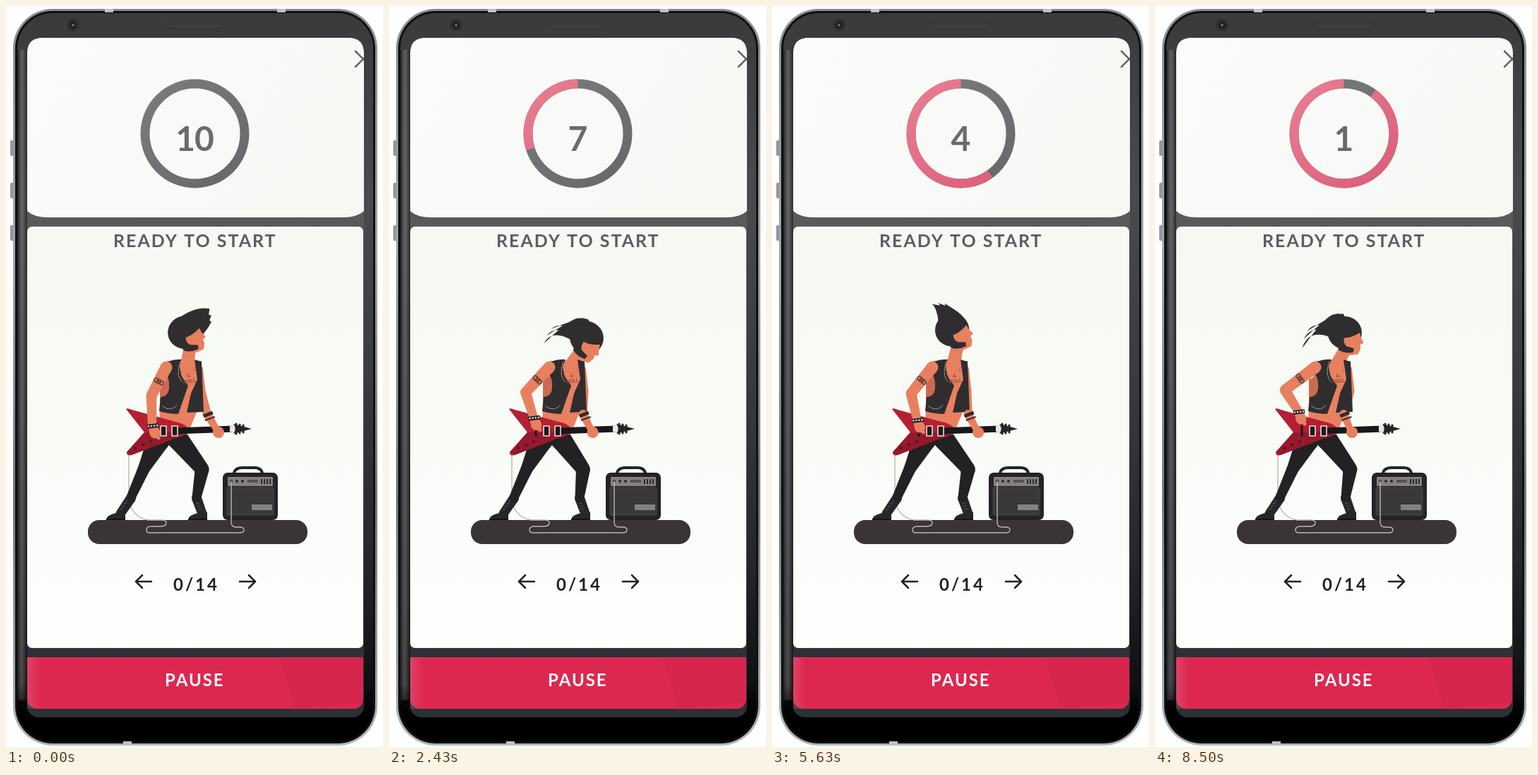
An HTML page with a canvas that plays this animation: 534x1048 px, repeating every 8530 ms.

```html
<!DOCTYPE html>
<html lang="en">
<head>
<meta charset="utf-8">
<title>Ready to start</title>
<style>
html, body { margin: 0; width: 100%; height: 100%; overflow: hidden; background: #fff; }
canvas { display: block; width: 534px; height: 1048px; }
</style>
</head>
<body>
<canvas id="stage" width="534" height="1048"></canvas>
<script>
const g = document.getElementById('stage').getContext('2d');
const LOOP = 8530, BEAT = 557, FIRST_TICK = 250, TAU = Math.PI * 2;
const SKIN = '#e8805f', DARK = '#302d2f', INK = '#222124', TEXT = '#202124';
const { sin, cos, hypot } = Math;
const rad = d => d * TAU / 360;

// Head nods once per beat, the hair trails behind it and the arms strum twice.
function poseAt(t) {
  const p = (t / BEAT + .5) * TAU;
  const sway = sin(p - .25), strum = cos(2 * p);
  return {
    x: 271 + 18 * cos(p - .2),
    y: 470 + 12 * cos(p - .8),
    tilt: 16 + 35 * cos(p - .2) + 7 * strum,
    hair: -74 + 128 * sway,
    length: 60 - 13 * cos(2 * p - .5) + 8 * sin(p),
    bend: 12 - 55 * sway,
    knee: 284.5 - 2.5 * cos(p - .5),
    strum
  };
}

function fillWith(color) { g.fillStyle = color; g.fill(); }

function poly(points, fill) {
  g.beginPath();
  for (let i = 0; i < points.length; i += 2) g.lineTo(points[i], points[i + 1]);
  g.closePath();
  fillWith(fill);
}

function line(points, color, width, cap = 'round') {
  g.beginPath();
  for (let i = 0; i < points.length; i += 2) g.lineTo(points[i], points[i + 1]);
  g.strokeStyle = color;
  g.lineWidth = width;
  g.lineCap = cap;
  g.lineJoin = 'round';
  g.stroke();
}

function box(x, y, w, h, r, fill, stroke, width = 1) {
  g.beginPath();
  g.roundRect(x, y, w, h, r);
  if (fill) fillWith(fill);
  if (stroke) { g.strokeStyle = stroke; g.lineWidth = width; g.stroke(); }
}

function dot(x, y, r, fill) {
  g.beginPath();
  g.arc(x, y, r, 0, TAU);
  fillWith(fill);
}

function shape(d, fill, stroke, width) {
  const path = new Path2D(d);
  if (fill) { g.fillStyle = fill; g.fill(path); }
  if (stroke) { g.strokeStyle = stroke; g.lineWidth = width; g.lineCap = 'round'; g.stroke(path); }
}

// Tapered chain through [x, y, width] joints.
function limb(color, ...joints) {
  joints.forEach(([x, y, w], i) => {
    dot(x, y, w / 2, color);
    if (!i) return;
    const [px, py, pw] = joints[i - 1];
    const d = 2 * hypot(x - px, y - py), nx = (py - y) / d, ny = (x - px) / d;
    poly([px + nx * pw, py + ny * pw, x + nx * w, y + ny * w,
      x - nx * w, y - ny * w, px - nx * pw, py - ny * pw], color);
  });
}

function at(x, y, turn, draw) {
  g.save();
  g.translate(x, y);
  g.rotate(turn);
  draw();
  g.restore();
}

function text(s, x, y, size, color, spacing = 0, align = 'left') {
  g.font = `700 ${size}px Lato, "Open Sans", sans-serif`;
  g.letterSpacing = spacing + 'px';
  g.textAlign = align;
  g.fillStyle = color;
  g.fillText(s, x, y);
}

function ramp(x0, y0, x1, y1, ...colors) {
  const r = g.createLinearGradient(x0, y0, x1, y1);
  colors.forEach((c, i) => r.addColorStop(i / (colors.length - 1), c));
  return r;
}

function phone() {
  g.fillStyle = '#fff';
  g.fillRect(0, 0, 534, 1048);
  for (const y of [190, 250, 310]) box(6, y, 6, 22, 2, '#96969c');
  box(10, 4, 516, 1042, 56, ramp(0, 4, 0, 1046, '#8d8d8f', '#a6a6aa', '#77777b', '#b5b5b8'));
  box(13, 7, 510, 1036, 53, '#101011');
  box(16, 10, 504, 1030, 50, ramp(0, 10, 0, 1040, '#3a3a3a', '#4b4b4b', '#3a3b3c', '#262728', '#050506'));
  g.fillStyle = ramp(16, 0, 30, 0, '#1a1a1a', 'rgba(125,125,128,.5)', 'rgba(20,20,20,.6)');
  g.fillRect(16, 62, 14, 920);
  box(16, 960, 504, 80, [0, 0, 50, 50], ramp(0, 960, 0, 1012, 'rgba(0,0,0,0)', '#000'));
  for (const [x, y] of [[140, 4], [384, 4], [166, 1040]]) {
    g.fillStyle = '#c4c0c6';
    g.fillRect(x, y, 12, 5);
  }
  dot(95, 27, 9, '#303030');
  dot(95, 27, 5, '#1d1e20');
  dot(95, 27, 2, '#66686b');
  box(228, 23, 80, 9, 3, '#3d3d3d', '#303030');

  box(30, 45, 477, 961, [22, 22, 16, 16], ramp(0, 300, 0, 920, '#5a5a5a', '#2b3136'));
  shape('M30 67Q30 45 52 45H485Q507 45 507 67V290Q497 299 477 299H60Q40 299 30 290Z',
    ramp(30, 45, 500, 300, '#fbfcfa', '#f6f8f4'));
  box(30, 312, 476, 596, 7, ramp(0, 312, 0, 908, '#f5f8f3', '#f9fbf7', '#fefefd'));
  box(30, 921, 476, 73, [2, 2, 14, 14], '#dc2850');
  g.fillStyle = ramp(30, 0, 48, 0, 'rgba(255,255,255,.12)', 'rgba(255,255,255,0)');
  g.fillRect(30, 921, 18, 73);
  poly([387, 921, 506, 921, 506, 985, 410, 994], 'rgba(120,0,40,.05)');
}

function timer(left) {
  const ring = (from, ...colors) => {
    g.beginPath();
    g.arc(267.5, 180.5, 70.5, from, TAU * .75);
    g.strokeStyle = ramp(200, 104, 330, 257, ...colors);
    g.lineWidth = 13;
    g.lineCap = 'butt';
    g.stroke();
  };
  ring(-TAU / 4, '#7b7c7d', '#666768');
  if (left < 10) ring(TAU * (.75 - (10 - left) / 10), '#e87f92', '#dc5c79');
  text(left, 267, 205, 48, '#6a6b6c', -1, 'center');
}

function labels() {
  g.save();
  g.beginPath();
  g.rect(480, 50, 27, 60);
  g.clip();
  for (const s of [-1, 1]) line([495, 75 - 11 * s, 517, 75 + 11 * s], '#656565', 2.5);
  g.restore();
  text('READY TO START', 152, 341, 25, '#5c5d5e', 2);
  text('0/14', 237, 827, 24, TEXT, 3);
  text('PAUSE', 225, 962, 24, '#fff', 2);
  for (const [x, s] of [[184, 1], [353, -1]]) {
    line([x, 814, x + 22 * s, 814], TEXT, 2.5);
    line([x + 9 * s, 805, x, 814, x + 9 * s, 823], TEXT, 2.5);
  }
}

function stageSet() {
  box(116, 727, 311, 34, 16, '#3a3534');
  shape('M323 660Q325 653 335 653H352Q361 653 363 660', null, '#262326', 4);
  box(307, 660, 78, 67, 7, '#262326');
  box(314, 666, 64, 13, 1, '#858080');
  for (let i = 0; i < 3; i++) dot(319 + i * 8, 672, 2, '#29272a');
  for (let i = 0; i < 4; i++) box(361 + i * 4, 669, 2, 7, 0, '#29272a');
  box(342, 670, 15, 4, 0, '#55514f');
  box(313, 681, 66, 39, 1, '#3b3839', '#49464a');
  box(348, 705, 29, 8, 0, '#858080');
  shape('M174 634V695Q176 722 201 727H222Q228 728 227 732T218 736H204Q199 737 199 741T204 745' +
    'H331Q337 745 337 741T331 737H326Q319 737 319 730V672', null, '#bcb6b2', 1.4);
}

function leg(hipX, hipW, kneeX, kneeW, ankleX, heelX) {
  limb('#292629', [ankleX, 696, 14], [heelX, 718, 13]);
  shape(`M${heelX + 7} 716V726H${heelX - 20}Q${heelX - 19} 720 ${heelX - 6} 717Z`, '#292629');
  line([heelX - 20, 726, heelX + 7, 726], '#121114', 2, 'butt');
  for (let i = 1; i < 5; i++) {
    const x = ankleX + (heelX - ankleX) * i / 5 - 4;
    line([x, 696 + i * 4, x + 4, 695 + i * 4], '#625c60', .9);
  }
  limb(INK, [hipX, 612, hipW], [kneeX, 655, kneeW], [ankleX, 695, 13]);
}

function torso() {
  poly([228, 502, 277, 502, 276, 560, 257, 606, 217, 606, 218, 560], SKIN);
  poly([218, 528, 232, 522, 232, 556, 218, 562], '#cb6a52');
  shape('M229 503Q240 499 250 500Q244 518 251 527L258 537L244 577Q230 577 217 573L219 553' +
    'Q232 552 231 536Q231 524 226 521Z', DARK);
  g.setLineDash([1.5, 2]);
  shape('M247 503Q240 522 250 532M222 566Q233 574 242 565', null, '#d5d0cc', 1);
  g.setLineDash([]);
  at(258, 517, -.12, () => ['ROCK', '&', 'ROLL'].forEach((s, i) => text(s, 0, i * 8, 7, '#89483c', 0, 'center')));
}

function guitar() {
  shape('M170 570Q172 568 178 571L240 588Q258 592 258 600Q256 608 240 611L178 635Q171 637 171 631L196 603Z', '#b51f32');
  poly([196, 603, 258, 602, 240, 611, 178, 635, 171, 631], '#94192b');
  line([240, 601, 324, 598], '#19181b', 9, 'butt');
  for (const x of [219, 235]) box(x, 594, 8, 14, 0, '#1c1a1d', '#eadfd8', 1.6);
  line([208, 593, 208, 609], '#1c1a1d', 3, 'butt');
  for (let i = 0; i < 3; i++) dot(183 + i * 11, 625 - i * 4.5, 1.8, '#47131e');
  poly([317, 594, 325, 592, 329, 598, 325, 604, 317, 602], '#e8e7df');
  poly([326, 598, 322, 591, 348, 598, 322, 605], '#252528');
  for (let i = 0; i < 3; i++) line([326 + i * 5, 591 + i, 326 + i * 5, 605 - i], '#252528', 3);
}

function fretArm(strum) {
  const hand = 290 + 11 * strum, ex = hand * .8 + 44;
  limb(SKIN, [273, 514, 12], [276, 545, 13], [ex, 577, 12]);
  poly([267, 500, 277, 503, 280, 574, 256, 575, 262, 548, 271, 528], DARK);
  limb(SKIN, [ex, 577, 12], [hand - 2, 600, 9]);
  for (const [dy, w] of [[0, 5], [6, 2]]) line([ex - 5 + dy / 3, 580 + dy, ex + 8 + dy / 2, 575 + dy], DARK, w, 'butt');
  dot(hand, 603, 8, SKIN);
}

function strumArm(strum) {
  const ex = 195 + 11 * strum, ey = 547 + 4 * strum, wx = 205 + 2 * strum, wy = 583 + 10 * strum;
  limb(SKIN, [227, 511, 17], [ex, ey, 15], [wx, wy, 12], [wx + 4, wy + 11, 15]);
  line([wx + 6, wy + 12, wx + 9, wy + 18], SKIN, 5);
  line([wx - 7, wy + 2, wx + 9, wy], '#272427', 6, 'butt');
  for (let i = 0; i < 4; i++) dot(wx - 5 + i * 4, wy + 1.5 - i * .4, 1.2, '#eee');
  at((227 + ex) / 2, (511 + ey) / 2, Math.atan2(ey - 511, ex - 227), () => {
    for (let i = -1; i < 2; i++) box(-3, i * 4 - 3, 6, 6, 3, null, '#66433f', 1.6);
  });
}

function lock(angle, length, bend) {
  const polar = (a, r) => [cos(rad(a)) * r, sin(rad(a)) * r];
  const reach = Math.max(32, length * .8), tip = polar(angle, length);
  g.beginPath();
  g.moveTo(...polar(angle + 85, 21));
  g.quadraticCurveTo(...polar(angle + bend + 28, reach * .9), ...tip);
  g.quadraticCurveTo(...polar(angle + bend - 28, reach), ...polar(angle - 85, 21));
  fillWith(DARK);
}

function head({ x, y, tilt, hair, length, bend }) {
  at(x, y, 0, () => {
    for (let i = 0; i < 3; i++) lock(hair + i * 11, length * (1 - i * .08), bend);
  });
  const c = cos(rad(tilt)), s = sin(rad(tilt));
  limb(SKIN, [x + 3 * c - 22 * s, y + 3 * s + 22 * c, 17], [256, 511, 20]);
  at(x, y, rad(tilt), () => {
    g.scale(.93, .93);
    g.beginPath();
    g.ellipse(0, 0, 26, 25, 0, 0, TAU);
    fillWith(DARK);
    shape('M-5 8Q8 9 23-2L25 5L30 13L25 16L26 22L23 31L8 34L-5 25Z', SKIN);
    shape('M-17 5L0 7Q-2 15 4 20L16 23L15 29Q3 32-7 27Q-10 18-17 12Z', DARK);
  });
}

function frame(now) {
  const t = now % LOOP, pose = poseAt(t);
  phone();
  timer(Math.max(1, 9 - Math.floor((t - FIRST_TICK) / 1000)));
  labels();
  stageSet();
  leg(217, 33, 195, 17, 177, 162);
  leg(243, 30, pose.knee - 9, 20, 270, 278);
  torso();
  head(pose);
  guitar();
  fretArm(pose.strum);
  strumArm(pose.strum);
  requestAnimationFrame(() => frame(performance.now() - start));
}

const start = performance.now();
frame(0);
</script>
</body>
</html>
```
